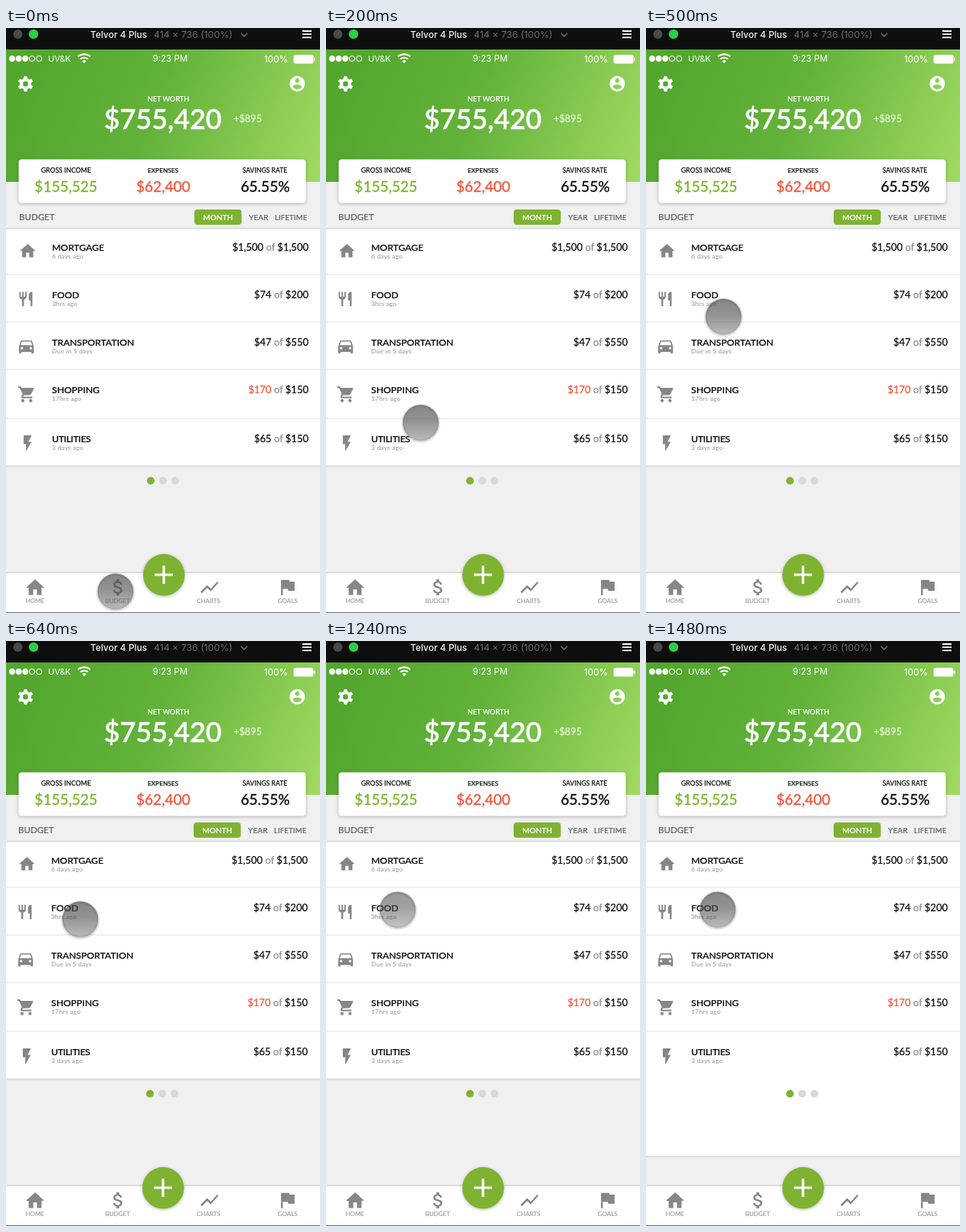
Write an HTML page that moves like this. It is 410x764 px and loops after 2.58 s.

```html
<!DOCTYPE html>
<html lang="en">
<head>
<meta charset="utf-8">
<title>Budget</title>
<style>
  html, body { margin: 0; width: 100%; height: 100%; overflow: hidden; background: #f0f0f0; }
  svg { display: block; width: 100%; height: 100%; }
  text { font-family: Lato, sans-serif; white-space: pre; stroke-width: .018em; }
  .ui { font-family: Inter, sans-serif; stroke-width: 0; }
  .m { font-weight: 500; }
  .b { font-weight: 700; stroke-width: 0; }
  .mid { text-anchor: middle; }
  .end { text-anchor: end; }
  .sub { letter-spacing: .22px; }
  .tight { letter-spacing: -.35px; }
  .card { filter: drop-shadow(0 1px 2px rgba(0, 0, 0, .28)); }
  .sheet { filter: drop-shadow(0 0 1.5px rgba(0, 0, 0, .3)); }
  .halo { filter: blur(.8px); }
</style>
</head>
<body>
<svg id="stage" viewBox="0 0 410 764"></svg>
<script>
const LOOP = 2580, STEP = 20;
const GREEN = '#7eb331', RED = '#f2553d', GREY = '#868686', INK = '#0c0c0c';

const ICONS = {
  home: 'M10 20v-6h4v6h5v-8h3L12 3 2 12h3v8z',
  fork: 'M11 9H9V2H7v7H5V2H3v7c0 2.1 1.7 3.8 3.75 4V22h2.5v-9C11.3 12.8 13 11.1 13 9V2h-2zM16 6v8h2.5v8H21V2c-2.8 0-5 2.2-5 4z',
  car: 'M5 6.2Q5.5 5 6.5 5h11q1 0 1.5 1.2L21 12v8q0 1-1 1h-1q-1 0-1-1v-1H6v1q0 1-1 1H4q-1 0-1-1v-8z' +
       'M5 11h14l-1.5-4.5h-11zM6.5 13a1.5 1.5 0 1 0 .01 0zM17.5 13a1.5 1.5 0 1 0 .01 0z',
  cart: 'M7 18a2 2 0 1 0 .01 0zM17 18a2 2 0 1 0 .01 0zM1 2v2h2l3.6 7.6-1.4 2.4c-.7 1.4.3 3 1.8 3h12v-2H7.2l1-2h7.3q1.2 0 1.8-1l3.6-6.5Q21.4 4 20 4H5.2l-.9-2z',
  bolt: 'M7 2v11h3v9l7-12h-4l4-8z',
  dollar: 'M11.8 10.9c-2.3-.6-3-1.2-3-2.15 0-1.1 1-1.85 2.7-1.85 1.8 0 2.45.85 2.5 2.1h2.2c-.05-1.7-1.1-3.3-3.2-3.8V3h-3v2.16' +
          'c-1.95.42-3.5 1.7-3.5 3.6 0 2.3 1.9 3.46 4.7 4.13 2.5.6 3 1.5 3 2.4 0 .7-.5 1.8-2.7 1.8-2.06 0-2.9-.9-3-2.1H6.3' +
          'c.1 2.2 1.75 3.4 3.7 3.83V21h3v-2.15c1.95-.37 3.5-1.5 3.5-3.55 0-2.84-2.4-3.8-4.7-4.4z',
  chart: 'M3.5 18.5l6-6 4 4L22 6.9l-1.4-1.4-7.1 8-4-4L2 17z',
  flag: 'M14.4 6L14 4H5v17h2v-7h5.6l.4 2h7V6z',
  user: 'M12 2a10 10 0 1 0 .01 0zM12 5a3 3 0 1 1-.01 0zM12 19.2c-2.5 0-4.7-1.3-6-3.2 0-2 4-3.1 6-3.1s6 1.1 6 3.1c-1.3 1.9-3.5 3.2-6 3.2z'
};

const ink = c => `fill="${c}" stroke="${c}"`;
const text = (x, y, str, size, color, cls = '') =>
  `<text x="${x}" y="${y}" font-size="${size}" ${ink(color)} class="${cls}">${str}</text>`;
const span = (str, color) => `<tspan ${ink(color)}>${str}</tspan>`;
const rect = (x, y, w, h, fill, more = '') =>
  `<rect x="${x}" y="${y}" width="${w}" height="${h}" fill="${fill}" ${more}/>`;
const dot = (x, y, r, fill, more = '') =>
  `<circle cx="${x}" cy="${y}" r="${r}" fill="${fill}" ${more}/>`;
const line = (d, stroke, w) =>
  `<path d="${d}" fill="none" stroke="${stroke}" stroke-width="${w}"/>`;
const icon = (name, x, y, scale, fill = GREY) =>
  `<path d="${ICONS[name]}" fill="${fill}" fill-rule="evenodd" transform="translate(${x} ${y}) scale(${scale})"/>`;

const gear = (x, y) => `<g transform="translate(${x} ${y})">` +
  dot(0, 0, 5.4, 'none', 'stroke="#fff" stroke-width="4"') +
  [0, 60, 120].map(a =>
    `<path d="M-2.5-6.5L-1.9-10h3.8L2.5-6.5zM-2.5 6.5L-1.9 10h3.8L2.5 6.5z" fill="#fff" transform="rotate(${a})"/>`).join('') +
  '</g>';

const windowBar = () =>
  rect(0, 0, 410, 28, '#0e0e0e') +
  dot(15.5, 8, 6, '#4b4b4b') + dot(36, 8, 6.2, '#2dcd48') +
  text(110, 13, 'Telvor 4 Plus', 12, '#f4f4f4', 'ui m') +
  text(193, 13, '414 × 736 (100%)', 12.3, '#6f6f6f', 'ui') +
  line('M307 7l4 4 4-4', '#777', 1.4) +
  line('M387 4h12M387 8.2h12M387 12.4h12', '#fff', 1.8);

const statusBar = () =>
  [8, 16.6, 25.2].map(x => dot(x, 40, 3.9, '#fff')).join('') +
  [34, 43.2].map(x => dot(x, 40, 3.6, 'none', 'stroke="#fff"')).join('') +
  text(55, 44, 'UV&amp;K', 11, '#fff', 'ui') +
  line('M94 37.2a12 12 0 0 1 16 0M97 40.6a7.5 7.5 0 0 1 10 0', '#fff', 2) +
  '<path d="M99.4 43.2a4 4 0 0 1 5.2 0L102 46z" fill="#fff"/>' +
  text(214.3, 43.5, '9:23 PM', 11.5, '#fff', 'ui mid') +
  text(368, 44.5, '100%', 11.7, '#fff', 'ui end') +
  rect(375.5, 35, 26, 11.5, '#fff', 'rx="2.5"') + rect(402, 38.5, 1.6, 4.5, '#fff', 'rx="0.8"');

const header = () =>
  rect(0, 28, 410, 173, 'url(#sky)') + statusBar() + gear(25.5, 73) + icon('user', 368.3, 60.8, 1, '#fff') +
  text(212, 96, 'NET WORTH', 9.2, '#fff', 'm mid') +
  text(204.8, 132.3, '$755,420', 35.8, '#fff', 'm mid') +
  text(297, 123.3, '+$895', 12.8, '#e9f6dc') +
  rect(16.5, 171.5, 375, 57, '#fff', 'rx="4" class="card"') +
  text(78.3, 188.8, 'GROSS INCOME', 8.7, INK, 'm mid') +
  text(205, 188.8, 'EXPENSES', 8.3, INK, 'm mid') +
  text(338, 188.8, 'SAVINGS RATE', 8.6, INK, 'm mid') +
  text(78.3, 214.3, '$155,525', 19.1, GREEN, 'mid') +
  text(205.3, 214.3, '$62,400', 19.1, RED, 'mid') +
  text(338.5, 214.3, '65.55%', 19.1, INK, 'mid');

const tabs = () =>
  text(16, 251.4, 'BUDGET', 11.5, '#686868', 'm') +
  rect(245, 237, 61.6, 20, GREEN, 'rx="4"') +
  text(275.8, 250.8, 'MONTH', 10, '#fff', 'b mid') +
  text(316, 250.8, 'YEAR', 10.2, '#686868', 'm') +
  text(392.3, 250.8, 'LIFETIME', 9.8, '#686868', 'm end');

// baseline, title, note, spent, limit, icon, icon x, icon y, icon scale
const ROWS = [
  [290.6, 'MORTGAGE', '6 days ago', '$1,500', '$1,500', 'home', 15, 279, 1.03],
  [352.6, 'FOOD', '3hrs ago', '$74', '$200', 'fork', 13.7, 342.6, .94],
  [414.6, 'TRANSPORTATION', 'Due in 5 days', '$47', '$550', 'car', 12.8, 402.6, 1.07],
  [476.6, 'SHOPPING', '17hrs ago', '$170', '$150', 'cart', 13.8, 466, 1.03],
  [540.6, 'UTILITIES', '3 days ago', '$65', '$150', 'bolt', 14.7, 530, 1.04]
];
const value = s => +s.replace(/[$,]/g, '');
const row = ([y, title, note, spent, limit, ...pic]) => {
  const tint = value(spent) > value(limit) ? RED : INK;
  return icon(...pic) +
    text(59, y, title, 12.2, INK, title === 'UTILITIES' ? 'm tight' : 'm') +
    text(59, y + 10.2, note, 8.4, '#a2a2a2', 'sub') +
    text(394, y, span(spent, tint) + span(' of ', '#8a8a8a') + limit, 13, INK, 'end');
};

const navBar = () =>
  rect(-10, 712, 430, 70, '#fff', 'class="sheet"') +
  icon('home', 23.6, 716.5, 1.2) + icon('dollar', 132.5, 716.5, 1.17) +
  icon('chart', 251.6, 716.5, 1.17) + icon('flag', 353.2, 716, 1.18) +
  [[37.7, 'HOME'], [145.7, 'BUDGET'], [264.5, 'CHARTS'], [367.7, 'GOALS']]
    .map(([x, s]) => text(x, 750.8, s, 8, '#9a9a9a', 'mid')).join('') +
  rect(0, 763, 410, 1, '#6d7074');

const addButton = () =>
  dot(205.2, 714.3, 27.2, GREEN, 'class="card"') +
  line('M193 714h24M205 702v24', '#fff', 3.2);

document.getElementById('stage').innerHTML = `
  <defs>
    <linearGradient id="sky" gradientUnits="userSpaceOnUse" x1="40" y1="50" x2="410" y2="190">
      <stop offset="0" stop-color="#54a72e"/><stop offset=".42" stop-color="#62b23a"/><stop offset="1" stop-color="#a0da62"/>
    </linearGradient>
    <linearGradient id="touch" x1="0" y1="0" x2="0" y2="1">
      <stop offset="0" stop-color="#3c3c3c" stop-opacity=".62"/>
      <stop offset=".45" stop-color="#444" stop-opacity=".58"/>
      <stop offset="1" stop-color="#5a5a5a" stop-opacity=".42"/>
    </linearGradient>
  </defs>
  ${rect(0, 0, 410, 764, '#f0f0f0')}
  ${rect(-10, 262.5, 430, 309, '#fff', 'id="list" class="sheet"')}
  ${[322, 384, 446, 510].map(y => rect(0, y - .5, 410, 1, '#e2e2e2')).join('')}
  ${windowBar()}${header()}
  <g class="page">${tabs()}${ROWS.map(row).join('')}
    ${[GREEN, '#d8d8d8', '#d8d8d8'].map((c, i) => dot(188 + 16 * i, 591.3, 5, c)).join('')}</g>
  ${navBar()}
  <g class="page">${addButton()}</g>
  <g id="cursor">
    ${dot(0, .8, 23.5, 'none', 'class="halo" stroke="#333" stroke-opacity=".32" stroke-width="1.8"')}
    ${dot(0, 0, 23.2, 'url(#touch)', 'id="pad"')}
    ${dot(0, 0, 23.2, 'none', 'stroke="#8a8a8a" stroke-opacity=".5" stroke-width=".8"')}
  </g>`;

const list = document.getElementById('list');
const cursor = document.getElementById('cursor');
const pad = document.getElementById('pad');
const pages = document.querySelectorAll('.page');

// time, x, y
const PATH = [
  [0, 143, 736], [50, 139, 698], [100, 133.5, 637], [150, 128.5, 574], [200, 123.7, 515.5],
  [250, 116.5, 463], [300, 110.5, 424], [360, 105.6, 396.5], [420, 103, 386], [500, 101.2, 377],
  [560, 99, 370.5], [640, 97, 363.5], [720, 95, 356.5], [800, 93.6, 351]
];
const along = t => {
  const i = PATH.findIndex(p => p[0] > t);
  if (i < 0) return PATH[PATH.length - 1].slice(1);
  const a = PATH[i - 1], b = PATH[i], k = (t - a[0]) / (b[0] - a[0]);
  return [1, 2].map(n => a[n] + (b[n] - a[n]) * k);
};
const smooth = (t, from, to) => {
  const k = Math.min(1, Math.max(0, (t - from) / (to - from)));
  return k * k * (3 - 2 * k);
};

function draw(t) {
  cursor.setAttribute('transform', `translate(${along(t)})`);
  pad.setAttribute('opacity', t >= 1240 && t < 1360 ? .86 : 1);
  list.setAttribute('height', 309 + 101 * smooth(t, 1340, 1480));
  const dx = Math.max(0, 1 - t / 50);
  pages.forEach(p => p.setAttribute('transform', `translate(${dx} 0)`));
}

const start = performance.now();
function tick() {
  const t = (performance.now() - start) % LOOP;
  draw(Math.floor(t / STEP) * STEP);
  requestAnimationFrame(tick);
}
tick();
</script>
</body>
</html>
```
